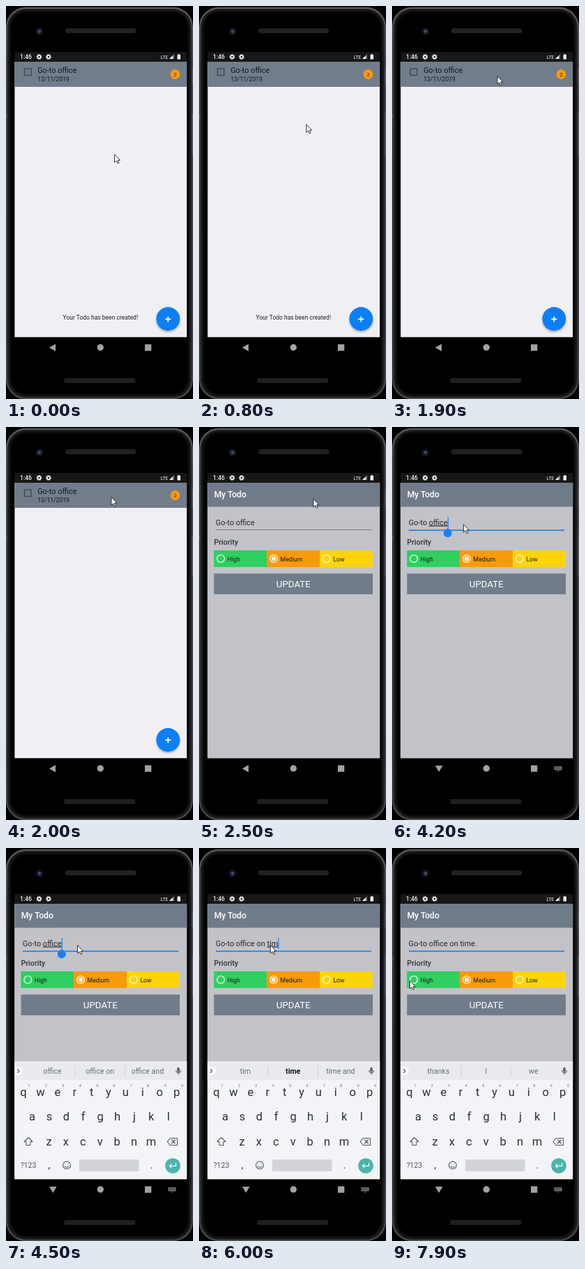
Write an HTML page that moves like this. It is 268 px wide and 564 px high and loops after 8 s.

```html
<!DOCTYPE html>
<html lang="en">
<head>
<meta charset="utf-8">
<title>Todo app</title>
<style>
html, body { margin: 0; width: 100%; height: 100%; overflow: hidden; background: #000; }
svg { display: block; width: 268px; height: 564px; font-family: Roboto, sans-serif; }
text { white-space: pre; }
.mid { text-anchor: middle; }
.bold { font-weight: 500; }
.line { fill: none; stroke-linecap: round; stroke-linejoin: round; }
.word { text-decoration: underline; }
</style>
</head>
<body>
<svg viewBox="0 0 268 564">
  <defs>
    <clipPath id="content"><rect x="12.4" y="80" width="246.7" height="395.5"/></clipPath>
    <linearGradient id="edge" x2="0" y2="1">
      <stop offset="0" stop-color="#5c5c5c"/><stop offset=".12" stop-color="#4a4a4a"/>
      <stop offset=".85" stop-color="#3e3e3e"/><stop offset="1" stop-color="#4c4c4c"/>
    </linearGradient>
    <filter id="soft" x="-50%" y="-50%" width="200%" height="200%"><feGaussianBlur stdDeviation="1.8"/></filter>
  </defs>

  <g id="phone">
    <rect x="1.3" y="3" width="265.4" height="560" rx="27" fill="#000" stroke="url(#edge)" stroke-width="2.4"/>
    <rect x="3.8" y="5.5" width="260.4" height="555" rx="25" fill="none" stroke="#1f1f1f" stroke-width="2.6"/>
    <rect x="6.3" y="8" width="255.4" height="550" rx="23" fill="none" stroke="#0d0d0d" stroke-width="2.4"/>
    <path d="M1 156v6M267 90v24M267 154v60" stroke="#5a5a5a" stroke-width="1.5"/>
    <circle cx="48" cy="36.5" r="5.5" fill="#11141b"/>
    <circle cx="48" cy="36.5" r="2.4" fill="#3d4a6c"/>
    <rect x="85" y="32" width="101.5" height="7" rx="3.5" fill="#212121"/>
    <rect x="83" y="534" width="102.5" height="7" rx="3.5" fill="#1f1f1f"/>
  </g>

  <g id="status" fill="#f2f2f2">
    <rect x="12.4" y="66" width="246.7" height="14" fill="#171717"/>
    <text x="20" y="76" font-size="8.6" class="bold">1:46</text>
    <g id="gears" fill="none" stroke="#f2f2f2"></g>
    <text x="221.4" y="75.7" font-size="6.9">LTE</text>
    <path d="M234 76h7v-7z" fill="#777"/>
    <path d="M234 76h4.8v-4.8z"/>
    <path d="M245.5 70h1.2v-1h2v1h1.3v6.5h-4.5z"/>
  </g>

  <g clip-path="url(#content)">
    <g id="list">
      <rect x="12" y="80" width="248" height="396" fill="#f0eff3"/>
      <rect x="12" y="80" width="248" height="36" fill="#717d8b"/>
      <rect x="26.5" y="90" width="9.5" height="9.5" fill="none" stroke="#3d444d" stroke-width="1.3"/>
      <text x="45.2" y="96" font-size="10.9" fill="#15181c">Go-to office</text>
      <text x="45.2" y="108" font-size="8.6" fill="#15181c">13/11/2019</text>
      <circle cx="242.4" cy="98" r="6.9" fill="#f8990b"/>
      <text x="242.4" y="101" font-size="8" class="mid" fill="#33250a">2</text>
      <text id="toast" x="81.6" y="450" font-size="8.5" fill="#222">Your Todo has been created!</text>
      <circle cx="232.3" cy="451" r="16.8" opacity=".3" filter="url(#soft)"/>
      <circle cx="232.3" cy="449" r="16.9" fill="#0c7ff5"/>
      <path d="M228.3 449.4h8M232.3 445.4v8" stroke="#fff" stroke-width="1.7"/>
    </g>

    <g id="form">
      <rect x="12" y="80" width="248" height="396" fill="#c2c3c9"/>
      <rect x="12" y="80" width="248" height="34.5" fill="#707b89"/>
      <text x="21.7" y="101" font-size="12.2" class="bold" fill="#fff">My Todo</text>
      <text id="input" x="23.8" y="140.5" font-size="10.9" fill="#24272b"><tspan></tspan><tspan class="word"></tspan></text>
      <rect id="rule" x="24" width="223"/>
      <rect id="caret" y="129" width="1.2" height="16" fill="#1a7ee6"/>
      <path id="handle" d="M0 145l4.5 3.2a6 6 0 1 1-9 0z" fill="#1a80ee"/>
      <text x="21.5" y="169" font-size="10.7" class="bold" fill="#303338">Priority</text>
      <g id="radios"></g>
      <rect x="21.5" y="210.3" width="227.5" height="29.8" fill="#717c8a"/>
      <text x="135.3" y="230" font-size="13.3" class="mid" fill="#fff">UPDATE</text>
    </g>

    <g id="keyboard">
      <rect x="12" y="306" width="248" height="170" fill="#f3f4f7"/>
      <rect x="12" y="306" width="248" height="27" fill="#e8eaee"/>
      <path d="M12 314h6a6 6 0 0 1 0 12h-6z" fill="#fff"/>
      <path d="M16.5 317.5l2.5 2.5-2.5 2.5" class="line" stroke="#4b55a0" stroke-width="1.3"/>
      <path d="M99.5 313v15M170.5 313v15" stroke="#cfd2d6"/>
      <g id="hints"></g>
      <g class="line" stroke="#555a60" stroke-width="1.1">
        <path d="M247 316.5v3.5" stroke-width="3.4"/>
        <path d="M243.7 319.5a3.3 3.3 0 0 0 6.6 0M247 323v2"/>
        <path d="M32 415.5l-6 6h3v5h6v-5h3z"/>
        <path d="M235 416.5h10.5v10h-10.5l-3.8-5zM237.5 419l5 5M242.5 419l-5 5"/>
        <circle cx="87" cy="455.3" r="5.4"/>
        <path d="M84.3 456.8q2.7 3 5.4 0M85 453.6h.1M89 453.6h.1"/>
      </g>
      <g id="keys"></g>
      <rect x="105" y="447" width="85.5" height="17" rx="1.5" fill="#d2d4d8"/>
      <circle cx="239" cy="456" r="10.8" fill="#4cb3ab"/>
      <path d="M243.5 452.5v3.8h-9M237 453.8l-2.6 2.5 2.6 2.5" class="line" stroke="#fff" stroke-width="1.3"/>
    </g>
  </g>

  <rect x="12" y="475.5" width="247.5" height="29" fill="#000"/>
  <g fill="#a2a2a2">
    <path id="back"/>
    <circle cx="135.3" cy="490" r="4.7"/>
    <rect x="199" y="485.5" width="9.3" height="9.3"/>
    <g id="imeIcon">
      <rect x="232.5" y="487" width="11" height="5.5" rx=".6" fill="#777"/>
      <path d="M234 488.7h8M234 490.2h8" stroke="#000" stroke-width=".8" stroke-dasharray="1 .8"/>
      <path d="M236.3 493.5h3.4l-1.7 1.6z" fill="#777"/>
    </g>
  </g>

  <path id="cursor" d="M0 0v11.4l2.6-2.3 1.9 4 1.8-.9-1.8-3.8h3.5z" fill="#fff" stroke="#222" stroke-width=".9"/>
</svg>

<script>
const LOOP = 8000;
const $ = id => document.getElementById(id);
const label = (x, y, size, fill, str, cls = 'mid') =>
  `<text x="${x}" y="${y}" font-size="${size}" fill="${fill}" class="${cls}">${str}</text>`;
const show = (id, on) => $(id).setAttribute('visibility', on ? 'visible' : 'hidden');
const shift = (id, x, y) => $(id).setAttribute('transform', `translate(${x} ${y})`);

$('gears').innerHTML = [47.5, 61].map(x =>
  `<circle cx="${x}" cy="73" r="2.1" stroke-width="1.6"/>
   <circle cx="${x}" cy="73" r="3.3" stroke-width="1.2" stroke-dasharray="1.5 1.05"/>`).join('');

$('radios').innerHTML = [['High', '#2fcf60'], ['Medium', '#f89a0c'], ['Low', '#fdd40a']].map(([name, color], i) => {
  const x = 21.4 + 75.8 * i;
  return `<rect x="${x}" y="177" width="75.8" height="24" fill="${color}"/>
    <circle cx="${x + 9.8}" cy="189" r="5.4" fill="none" stroke="#fff" stroke-opacity=".85" stroke-width="1.4"/>` +
    (i === 1 ? `<circle cx="${x + 9.8}" cy="189" r="3.2" fill="#fff" fill-opacity=".9"/>` : '') +
    label(x + 19.4, 192.5, 8.7, '#1e1e1a', name, '');
}).join('');

const rows = [['qwertyuiop', 25, 356], ['asdfghjkl', 37.5, 391], ['zxcvbnm', 61.5, 427]];
$('keys').innerHTML = rows.map(([chars, x0, y], r) => [...chars].map((c, i) => {
  const x = x0 + 24.4 * i;
  return label(x, y, 16.5, '#2c3035', c) + (r ? '' : label(x + 8, 343, 6, '#777', (i + 1) % 10));
}).join('')).join('') +
  label(32, 459, 10.5, '#50555b', '?123') +
  label(62, 460, 15, '#33373c', ',') + label(208.5, 460, 15, '#33373c', '.');

// time, committed text, word being composed, suggestions
const edits = [
  [0, 'Go-to office', '', ''],
  [3700, 'Go-to ', 'office', 'office|office on|office and'],
  [4100, 'Go-to ', 'office', 'office|office on|office and'],
  [4800, 'Go-to office ', '', 'on|and|is'],
  [5000, 'Go-to office ', 'o', 'o|on|of'],
  [5150, 'Go-to office ', 'on', 'on|on the|on my'],
  [5300, 'Go-to office on ', '', 'the|my|a'],
  [5450, 'Go-to office on ', 't', 't|the|to'],
  [5600, 'Go-to office on ', 'ti', 'ti|to|time'],
  [5750, 'Go-to office on ', 'tim', 'tim|time|time and'],
  [6100, 'Go-to office on ', 'time', 'time|time and|times'],
  [6300, 'Go-to office on time.', '', 'thanks|I|we'],
];
// time, x, y of the pointer tip
const path = [
  [0, 155.5, 213], [400, 155.5, 213], [1350, 151, 100.7], [2000, 151, 100.7], [2450, 164, 103.4],
  [2750, 164, 103.4], [3500, 102.5, 139.6], [7450, 102.5, 139.6], [7850, 25.5, 190.6], [LOOP, 25.5, 190.6],
];

const ramp = (t, a, b) => Math.min(1, Math.max(0, (t - a) / (b - a)));
const smooth = k => k * k * (3 - 2 * k);
const easeOut = k => 1 - (1 - k) ** 3;
const latest = t => edits.filter(e => e[0] <= t).pop();

function drawInput(t) {
  const [since, done, word] = latest(t);
  const focused = t >= 3700;
  const [plain, composing] = $('input').children;
  plain.textContent = done;
  composing.textContent = word;
  $('rule').setAttribute('y', focused ? 147.3 : 147);
  $('rule').setAttribute('height', focused ? 1.8 : 1);
  $('rule').setAttribute('fill', focused ? '#2c86e2' : '#74777e');

  const end = 23.8 + $('input').getComputedTextLength();
  $('caret').setAttribute('x', end);
  show('caret', focused && (t - since) % 1000 < 500);
  shift('handle', end, 0);
  show('handle', focused && t < 4800);
}

function drawKeyboard(t) {
  shift('keyboard', 0, 170 * (1 - easeOut(ramp(t, 4220, 4480))));
  show('keyboard', t > 4220);
  const open = t >= 4150;
  show('imeIcon', open);
  $('back').setAttribute('d', open ? 'M62 486h10.6l-5.3 9z' : 'M71 485v10.4l-9-5.2z');
  const words = latest(Math.max(0, t - 150))[3].split('|');
  $('hints').innerHTML = words.map((w, i) => {
    const strong = w === 'time' && i === 1;
    return `<g font-weight="${strong ? 700 : 400}">` +
      label(66.5 + 68.2 * i, 324, 10.6, strong ? '#15181b' : '#686d73', w) + '</g>';
  }).join('');
}

function draw(t) {
  $('toast').setAttribute('opacity', 1 - ramp(t, 1000, 1300));
  const enter = easeOut(ramp(t, 2080, 2380));
  show('form', enter > 0);
  $('form').setAttribute('opacity', enter);
  shift('form', 0, 40 * (1 - enter));
  drawInput(t);
  drawKeyboard(t);

  const i = path.findIndex(p => p[0] > t);
  const [a, b] = [path[i - 1], path[i]];
  const k = smooth(ramp(t, a[0], b[0]));
  shift('cursor', a[1] + (b[1] - a[1]) * k, a[2] + (b[2] - a[2]) * k);
}

const start = performance.now();
function tick() {
  draw((performance.now() - start) % LOOP);
  requestAnimationFrame(tick);
}
tick();
</script>
</body>
</html>
```
